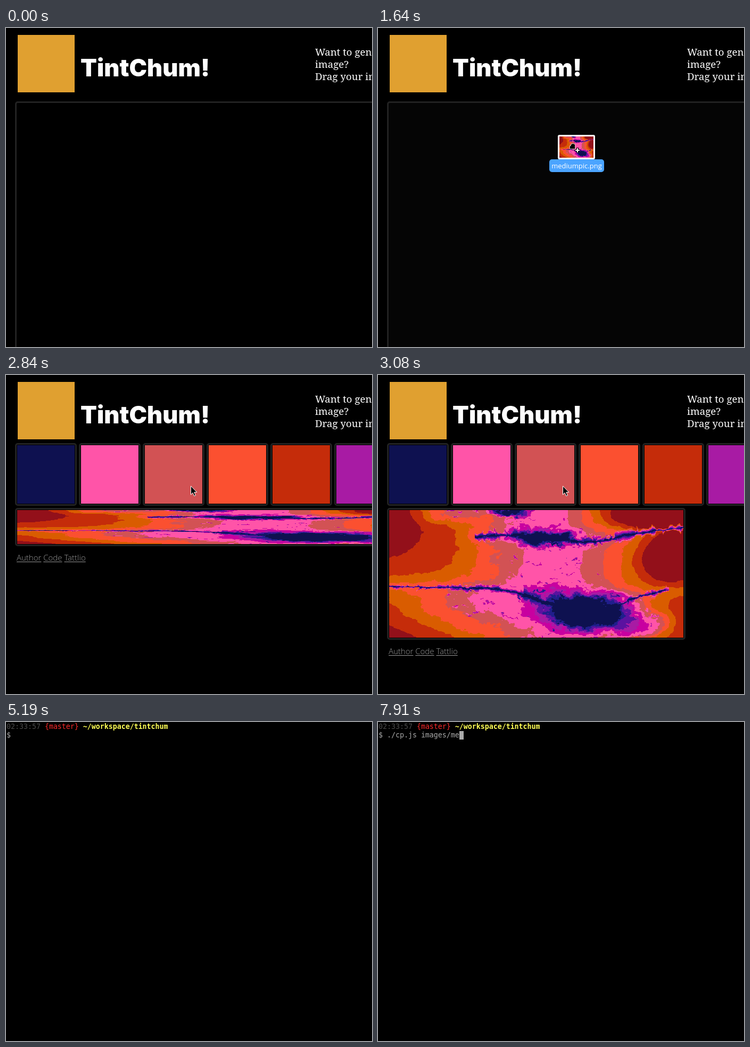
An HTML page with a canvas for the animation above (8 s loop, 688 px wide and 600 px high).

```html
<!DOCTYPE html>
<html lang="en">
<head>
<meta charset="utf-8">
<title>TintChum!</title>
<style>
html, body { margin: 0; width: 100%; height: 100%; overflow: hidden; background: #000; }
#stage { position: relative; width: 688px; height: 600px; overflow: hidden; background: #000; color: #fff; }
#stage * { box-sizing: border-box; }
.abs, #page, #term { position: absolute; left: 0; top: 0; }
#page, #term { width: 688px; height: 600px; overflow: hidden; }
.logo { left: 22px; top: 13px; width: 107px; height: 108px; background: #e0a030; }
.title { margin: 0; left: 140px; top: 45px; font: 900 45px/60px Inter, sans-serif; white-space: nowrap; }
.intro { left: 581px; top: 33px; font: 18.7px/23px "Noto Serif", serif; white-space: nowrap; }
.framed { border: 3px solid #222; border-radius: 5px; padding: 1px; left: 17px; }
#drop { width: 955px; }
.swatch { top: 128px; width: 116px; }
.swatch i { display: block; width: 100%; height: 100%; }
#picture { top: 250px; }
#picture canvas { display: block; width: 100%; height: 100%; image-rendering: pixelated; }
#links { left: 20px; font: 300 15px/20px "Open Sans", sans-serif; color: #999; white-space: nowrap; }
#links u { text-underline-offset: 2px; text-decoration-thickness: 1px; }
#drag { width: 103px; height: 70px; }
#thumb { left: 16px; width: 70px; height: 46px; border: 3px solid #fff; border-radius: 3px; }
#label { top: 46px; width: 103px; height: 24px; border-radius: 5px; background: #4ba4ff;
  font: 13px/24px "Open Sans", sans-serif; text-align: center; }
#term { background: #000; color: #aaa; font: 13.289px/16px "DejaVu Sans Mono", monospace; white-space: pre; }
#term div { position: absolute; left: 1px; }
.clock { color: #4a4a4a; }
.branch { color: #ff2a2a; }
.path { color: #ffff55; font-weight: bold; }
#caret { display: inline-block; width: 8px; height: 16px; background: #aaa; vertical-align: top; }
</style>
</head>
<body>
<div id="stage">
  <div id="page">
    <div class="abs logo"></div>
    <h1 class="abs title">TintChum!</h1>
    <div class="abs intro">Want to generate a palette from an<br>image?<br>Drag your image below!</div>
    <div id="drop" class="abs framed"></div>
    <div id="swatches"></div>
    <div id="picture" class="abs framed"><canvas id="art" width="468" height="292"></canvas></div>
    <div id="links" class="abs"><u>Author</u> <u>Code</u> <u>Tattlio</u></div>
    <div id="drag" class="abs">
      <canvas id="thumb" class="abs" width="64" height="40"></canvas>
      <div id="label" class="abs">mediumpic.png</div>
      <svg class="abs" width="103" height="70">
        <path d="M38.5 20.5h2v-3h2v-1h4v1h2v9h-10z" fill="#000" stroke="#e8d8d0" stroke-width=".8"/>
        <path d="M53 24v10M48 29h10" stroke="#000" stroke-width="4"/>
        <path d="M53 25v8M49 29h8" stroke="#fff" stroke-width="2"/>
      </svg>
    </div>
    <svg id="pointer" class="abs" width="16" height="24">
      <path d="M.5 .8V17l3.6-3.5 2.6 6 2.7-1.2-2.6-5.8h5z" fill="#000" stroke="#fff"/>
    </svg>
  </div>
  <div id="term">
    <div style="top:1px"><span class="clock">02:33:57</span> <span class="branch">{master}</span> <span class="path">~/workspace/tintchum</span></div>
    <div style="top:17px">$ <span id="typed"></span><span id="caret"></span></div>
  </div>
</div>
<script>
const $ = id => document.getElementById(id);
const LOOP = 8000;
const clamp = (v, lo, hi) => Math.min(hi, Math.max(lo, v));
const ramp = (t, from, to) => clamp((t - from) / (to - from), 0, 1);
const mix = (a, b, k) => a + (b - a) * k;
const smooth = k => k * k * (3 - 2 * k);
const bell = (v, center, width) => Math.exp(-(((v - center) / width) ** 2));

// Fractal landscape: a central ridge, two spiky veins and a few mounds, cut into colour bands.
const bands = ['#93101a', '#c52c0a', '#d95c00', '#fb5030', '#d25254', '#ff54a8',
  '#c800a0', '#a81ba4', '#5b12a0', '#201e8c', '#0e1150']
  .map(c => [1, 3, 5].map(i => parseInt(c.slice(i, i + 2), 16)));
const mounds = [
  { x: 312, y: 229, rx: 64, ry: 44, gain: 9 },
  { x: 245, y: 60, rx: 46, ry: 19, gain: 7 },
  { x: 188, y: 4, rx: 28, ry: 13, gain: 7 },
  { x: 395, y: 262, rx: 50, ry: 35, gain: 4 },
  { x: 100, y: 5, rx: 50, ry: 26, gain: 2.6 },
  { x: 110, y: 230, rx: 100, ry: 45, gain: 1.6 },
  { x: 445, y: 115, rx: 55, ry: 80, gain: -2 },
  { x: 400, y: 8, rx: 90, ry: 38, gain: -3 }
];
const lowerVein = x => 176 + 54 * bell(x, 310, 95);
const upperVein = x => 57 - .06 * (x - 185) + 22 * bell(x, 320, 75);

const hash = (x, y) => {
  const s = Math.sin(x * 127.1 + y * 311.7) * 43758.5453;
  return s - Math.floor(s);
};
function noise(x, y) {
  const i = Math.floor(x), j = Math.floor(y), u = smooth(x - i);
  const row = k => mix(hash(i, k), hash(i + 1, k), u);
  return mix(row(j), row(j + 1), smooth(y - j));
}
function fractal(x, y) {
  let sum = 0;
  for (let o = 0, f = 1 / 28; o < 4; o++, f *= 2.1) sum += (noise(x * f + o * 17, y * f) - .5) / 1.45 ** o;
  return sum;
}
function terrain(x, y) {
  const ridge = 5 * bell(x, 258, 130);
  const halo = 1 - ridge / 6;
  let level = ridge + 3 * halo * Math.exp(-Math.abs(y - lowerVein(x)) / 35);
  level += 2 * halo * ramp(x, 90, 160) * Math.exp(-Math.abs(y - upperVein(x)) / 22);
  for (const m of mounds)
    level += m.gain * Math.exp(-(Math.hypot((x - m.x) / m.rx, (y - m.y) / m.ry) ** 3));
  return level;
}
// Column noise stretches the vein into upright spikes.
function vein(x, distance, thickness) {
  const spike = .25 + 2.2 * noise(x / 3.5, distance > 0 ? 3 : 60) * noise(x / 11, 8);
  return 10.6 - Math.abs(distance) * spike * 6 / thickness;
}
function levelAt(px, py) {
  const rough = clamp(terrain(px, py), 0, 5);
  const n = fractal(px, py), m = fractal(px + 300, py + 90);
  const warp = 2 + rough * 3.2;
  const x = px + n * warp, y = py + m * warp;
  const curl = rough > 3.4 ? 22 * Math.max(0, noise(x / 9, y / 6) - .84) : 0;
  const thickness = 2.5 + 6 * bell(px, 245, 85);
  let level = terrain(x, y) + n * rough * .1 + curl;
  if (px < 445) level = Math.max(level, vein(x, py + m * 5 - lowerVein(px), thickness));
  if (px > 135) level = Math.max(level, vein(x + 90, py + m * 5 - upperVein(px), thickness));
  return clamp(Math.round(level), 0, 10);
}
function paint() {
  const art = $('art'), { width, height } = art, ctx = art.getContext('2d');
  const image = ctx.createImageData(width, height);
  for (let y = 0, i = 0; y < height; y++)
    for (let x = 0; x < width; x++, i += 4) image.data.set([...bands[levelAt(x, y)], 255], i);
  ctx.putImageData(image, 0, 0);
  $('thumb').getContext('2d').drawImage(art, 0, 0, 64, 40);
}

const swatches = ['#0e1150', '#ff54a8', '#d25254', '#fb5030', '#c52c0a', '#a81ba4'].map((color, i) => {
  const box = document.createElement('div');
  box.className = 'abs framed swatch';
  box.style.left = 17 + i * 120 + 'px';
  box.innerHTML = `<i style="background:${color}"></i>`;
  $('swatches').append(box);
  return box;
});

const hold = (t, from, step) => from + Math.floor((t - from) / step + .01) * step;
const show = (el, on) => { el.style.visibility = on ? 'visible' : 'hidden'; };
const move = (el, x, y) => { el.style.transform = `translate(${Math.round(x)}px, ${Math.round(y)}px)`; };
const size = (el, props) => { for (const k in props) el.style[k] = Math.round(props[k]) + 'px'; };

function drawDrag(t) {
  const dragging = t >= 900 && t < 2490;
  const left = 1 - ramp(hold(t, 1160, 53), 1107, 1860);
  const enter = t < 950 ? 20 : 0;
  show($('drag'), dragging);
  $('drop').style.background = dragging ? '#050505' : '#000';
  move($('drag'), mix(303, 624, left ** 2.33) + enter, mix(187, 273, left ** 1.5) + enter / 2);
}

function drawResult(t) {
  const s = hold(t, 2840, 48);
  const open = ramp(s, 2470, 2753);
  const grow = s < 3120 ? ramp(s, 2753, 3151) : 1;
  const dropHeight = 480 * (1 - open), height = 292 * grow;
  show($('drop'), open < 1);
  size($('drop'), { top: mix(138, 250, open), height: 8 + dropHeight });
  for (const box of swatches) {
    show(box, t >= 2490);
    size(box, { height: 8 + 110 * open });
  }
  show($('picture'), open >= 1);
  size($('picture'), { width: 8 + mix(947, 468, grow), height: 8 + height });
  size($('links'), { top: 269 + height + dropHeight });
}

function drawPointer(t) {
  const k = ramp(hold(t, 3650, 40), 3610, 4090);
  show($('pointer'), t >= 2490 && t < 4350);
  move($('pointer'), mix(347, 345, k) - 17 * Math.sin(Math.PI * k), mix(208, 592, smooth(k)));
}

// Bursts of typing; a zero step is a tab completion
const bursts = [
  { at: 6470, step: 110, text: './' },
  { at: 6890, step: 85, text: 'cp' },
  { at: 7060, step: 0, text: '.js ' },
  { at: 7340, step: 60, text: 'imag' },
  { at: 7690, step: 0, text: 'es/' },
  { at: 7830, step: 80, text: 'me' }
];
function drawTerminal(t) {
  $('typed').textContent = bursts.filter(b => t >= b.at)
    .map(b => b.step ? b.text.slice(0, 1 + Math.floor((t - b.at) / b.step)) : b.text).join('');
  show($('caret'), t >= 5240 && (t < 5780 || t >= 6360));
}

function render(t) {
  const terminal = t >= 5190;
  $('page').style.display = terminal ? 'none' : 'block';
  $('term').style.display = terminal ? 'block' : 'none';
  if (terminal) return drawTerminal(t);
  drawDrag(t);
  drawResult(t);
  drawPointer(t);
}

paint();
render(0);
const start = performance.now();
requestAnimationFrame(function tick() {
  render((performance.now() - start) % LOOP);
  requestAnimationFrame(tick);
});
</script>
</body>
</html>
```
